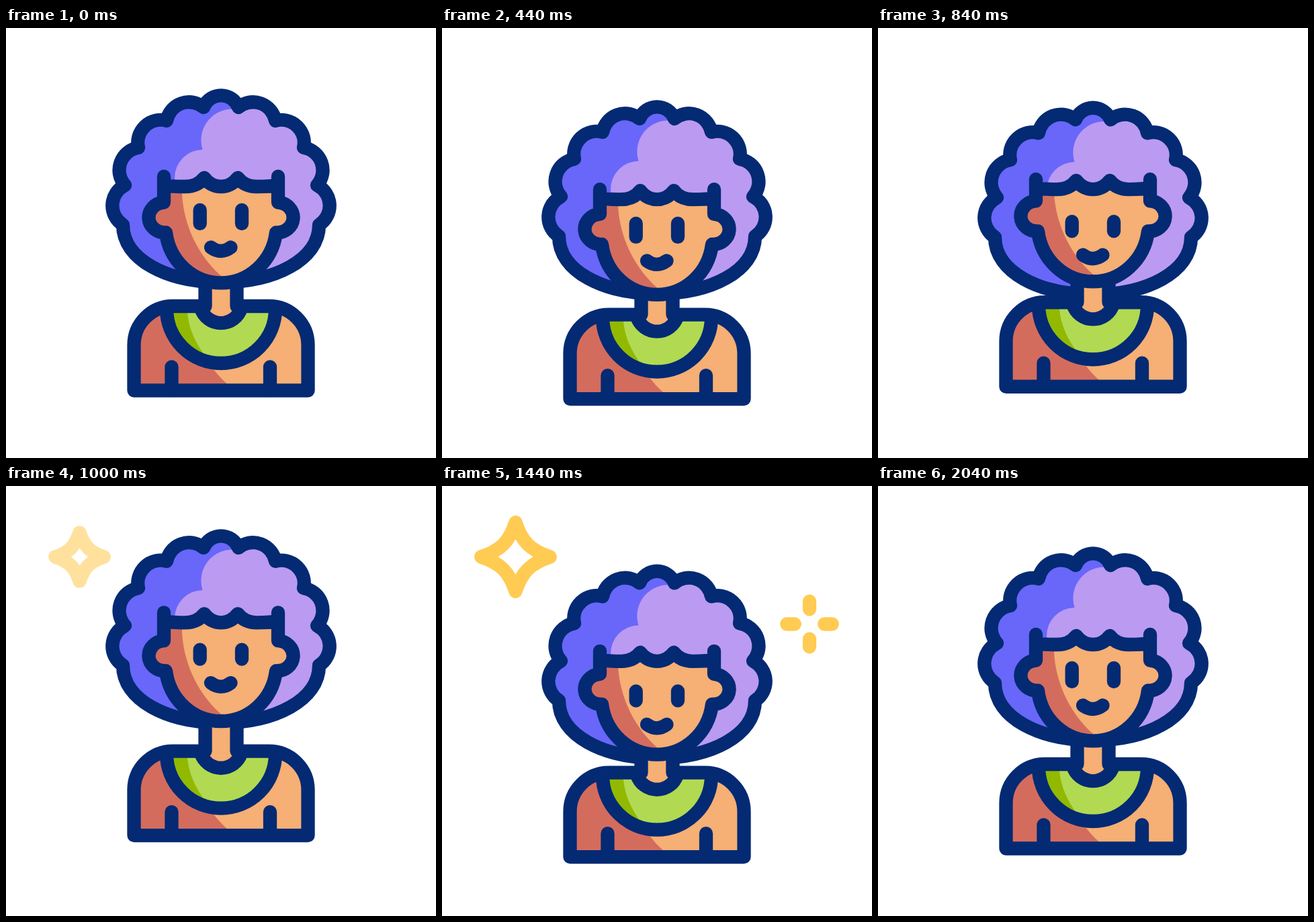
Write an HTML page that moves like this. It is 640 px wide and 640 px high and loops after 2.2 s.

```html
<!DOCTYPE html>
<html lang="en">
<head>
<meta charset="utf-8">
<title>Bouncing avatar</title>
<style>
html, body { margin: 0; width: 100%; height: 100%; overflow: hidden; background: #fff; }
svg { display: block; width: 100%; height: 100%; }
.line, .gold { stroke: #032a73; stroke-width: 20.3; stroke-linecap: round; stroke-linejoin: round; }
.line { fill: none; }
.gold { fill: none; stroke: #ffcb52; }
.skin { fill: #f6af74; }
.shade { fill: #d46c5e; }
</style>
</head>
<body>
<svg viewBox="0 0 640 640">
  <defs>
    <clipPath id="hairClip"><path class="hairShape"/></clipPath>
    <clipPath id="faceClip"><path class="faceShape"/></clipPath>
    <clipPath id="collarClip"><path d="M239 414V418A81 81 0 0 0 401 418V414Z"/></clipPath>
  </defs>

  <g id="hair">
    <path class="hairShape" fill="#6966fa"/>
    <path clip-path="url(#hairClip)" fill="#bb9af2"
      d="M345 80V121.5A46.3 46.3 0 0 0 292.5 181A42 42 0 0 0 251 223V240H320V400H520V80Z"/>
    <path class="hairShape line"/>
  </g>

  <g id="body">
    <path class="bodyShape skin"/>
    <path class="shade" d="M248 414A58 58 0 0 0 190.5 472V539.5H341Q316 521 300 495V414Z"/>
    <g clip-path="url(#collarClip)">
      <rect x="230" y="410" width="180" height="100" fill="#b1da52"/>
      <path fill="#92b900" d="M230 410H270V424Q273 458 298 490V510H230Z"/>
    </g>
    <path class="line" d="M239 418A81 81 0 0 0 401 418M246.5 504.5V539M393 504.5V539"/>
    <path class="line skin" d="M290 417A31.4 31.4 0 0 0 350 417" style="fill:#f6af74"/>
    <path id="neck" class="skin"/>
    <path class="bodyShape line"/>
  </g>

  <path class="faceShape skin"/>
  <g clip-path="url(#faceClip)">
    <path id="faceShade" class="shade" d="M190 190H262V246C264 295 288 343 325 373H190Z"/>
  </g>
  <path class="faceShape line"/>
  <path id="eyes" class="line"/>
  <path id="mouth" class="line" d="M305 326.5Q320 337.5 334.5 326.5"/>

  <path id="star" class="gold" transform="translate(109.5 105.5)"/>
  <path id="spark" class="gold" transform="translate(547 205.5)"/>
</svg>
<script>
const LOOP = 2200, STEP = 40;
const $ = id => document.getElementById(id);
const setPath = (name, d) =>
  document.querySelectorAll('.' + name).forEach(el => el.setAttribute('d', d));
const shift = (id, y) => $(id).setAttribute('transform', `translate(0 ${y})`);

const ramp = (t, from, to) => Math.min(1, Math.max(0, (t - from) / (to - from)));
const ease = (t, from, to) => {
  const x = ramp(t, from, to);
  return x * x * (3 - 2 * x);
};
const pulse = (t, peak, period) => Math.cos(2 * Math.PI * (t - peak) / period);

// One swing shared by all parts: down, up, down, rest, a beat every 400 ms.
// The share says how strongly a part's lag delays that beat.
const BEATS = [0, 1, -1, 0.67, 0], LAG_SHARE = [0.4, 1, 1.2, 0.7, 1.7];

function swing(t, size, lag) {
  const beatTime = i => 200 + 400 * i + lag * LAG_SHARE[i];
  let level = 0;
  for (let i = 1; i < BEATS.length; i++)
    level += (BEATS[i] - BEATS[i - 1]) * ease(t, beatTime(i - 1), beatTime(i));
  return size * level;
}

function hairPath() {
  const left = [[174, 293], [177, 234], [197, 178], [239, 138], [294, 118]];
  const right = left.map(([x, y]) => [640 - x, y]).reverse();
  const curl = (p, r) => `A${r} ${r} 0 0 1 ${p}`;
  return `M${left[0]}` + left.slice(1).map(p => curl(p, 34)).join('') +
    curl(right[0], 28) + right.slice(1).map(p => curl(p, 34)).join('') +
    'C466 345 400 378.5 320 378.5C240 378.5 174 345 174 293Z';
}

function facePath(fringe, head) {
  const top = 259.5 + head, low = 304.5 + head;
  return `M235 ${221 + fringe}v13c10 2 20 2 32 2q18 0 28-13q10 13 25 13q15 0 25-13` +
    `q10 13 28 13c12 0 22 0 32-2v-13V${top}A24 22.5 0 0 1 402 ${low}` +
    `A82.7 86 0 0 1 238 ${low}A24 22.5 0 0 1 235 ${top}Z`;
}

const bodyPath = neckTop =>
  `M296.5 ${neckTop}V414H248A58 58 0 0 0 190.5 472V539.5H449.5V472A58 58 0 0 0 391.5 414H343.5V${neckTop}`;

const turns = [[0, -1], [1, 0], [0, 1], [-1, 0]];

function starPath(r) {
  const a = 0.19 * r, b = 0.43 * r;
  const side = ([x, y]) => {
    const [u, v] = [-y, x];
    return `C${x * b + u * a} ${y * b + v * a} ${x * a + u * b} ${y * a + v * b} ${u * r} ${v * r}`;
  };
  return `M0 ${-r}` + turns.map(side).join('') + 'Z';
}

function sparkPath(outer) {
  const inner = 56 - outer;
  return turns.map(([x, y]) => `M${x * inner} ${y * inner}L${x * outer} ${y * outer}`).join('');
}

function draw(t) {
  const body = swing(t, 19.4, 0);
  const head = swing(t, 30.5, 28);
  const fringe = swing(t, 37, 50);
  const features = swing(t, 42.5, 70);
  const neckTop = 377 + head - body;

  shift('hair', swing(t, 41, 95));
  shift('body', body);
  setPath('bodyShape', bodyPath(neckTop));
  $('neck').setAttribute('d', `M296.5 ${neckTop}H343.5V418H296.5Z`);

  setPath('faceShape', facePath(fringe, head));
  shift('faceShade', head);
  shift('mouth', features);
  const squint = ease(t, 440, 720) - ease(t, 1520, 1960);
  const eyeLow = 291 + features, eyeTop = eyeLow - 20 + 6 * squint;
  $('eyes').setAttribute('d', `M288.7 ${eyeTop}V${eyeLow}M351 ${eyeTop}V${eyeLow}`);

  const fadeOut = 1 - ramp(t, 1880, 2030);
  $('star').setAttribute('d', starPath((58 + 9.5 * pulse(t, 1200, 640)) * ease(t, 842, 1100)));
  $('star').setAttribute('opacity', ramp(t, 890, 1085) * fadeOut);
  $('spark').setAttribute('d', sparkPath(28 + (9 + 6 * pulse(t, 1590, 440)) * ease(t, 1040, 1280)));
  $('spark').setAttribute('opacity', ramp(t, 1040, 1240) * fadeOut);
}

setPath('hairShape', hairPath());
const start = performance.now();
function tick() {
  const t = (performance.now() - start) % LOOP;
  draw(Math.floor(t / STEP) * STEP);
  requestAnimationFrame(tick);
}
tick();
</script>
</body>
</html>
```
